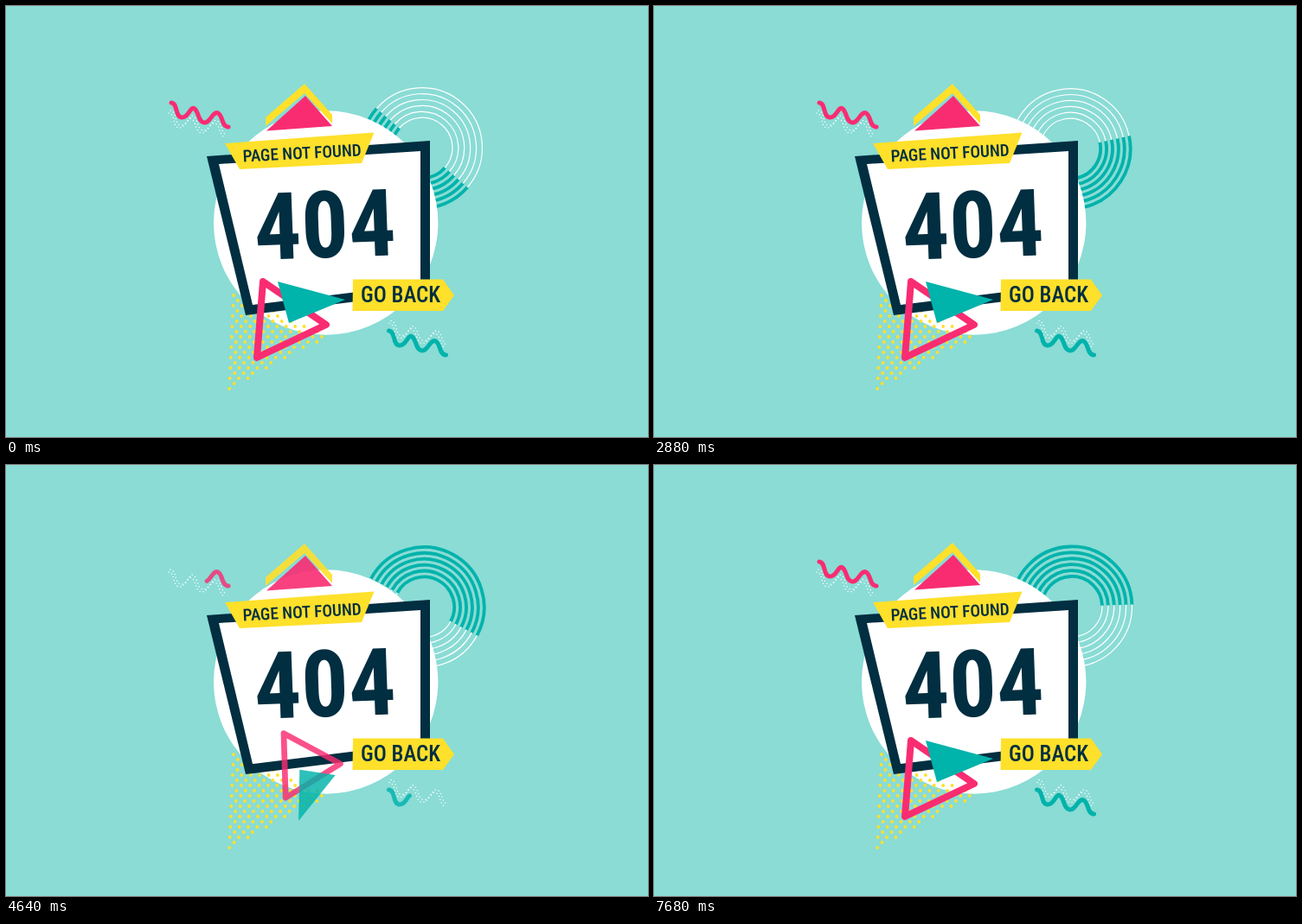
An HTML page for the animation above (7.84 s loop, 742 by 499 pixels).

```html
<!DOCTYPE html>
<html lang="en">
<head>
<meta charset="utf-8">
<title>Page not found</title>
<style>
  html, body { margin: 0; width: 100%; height: 100%; overflow: hidden; background: #8adcd5; }
  svg { display: block; width: 742px; height: 499px; }
  text { font-family: "Roboto Condensed", Roboto, sans-serif; font-stretch: 75%; fill: #012e40; }
  .wave, .dotted { fill: none; stroke-linecap: round; }
  .wave { stroke-width: 5; }
  .dotted { stroke: #fff; stroke-width: 1.5; stroke-dasharray: 0 4; }
</style>
</head>
<body>
<svg viewBox="0 0 742 499">
  <defs>
    <path id="curve" pathLength="1" d="M191 112C199 113 195 128 203 129S213 115 218 119S222 134 229 135S239 121 245 124S249 140 257 140"/>
    <path id="trail" d="M191 112C199 113 195 128 203 129S213 115 218 119S222 134 229 135S239 121 245 124S249 140 257 140"/>
  </defs>

  <g id="rings" fill="none"></g>
  <circle cx="369.7" cy="251" r="129.7" fill="#fff"/>
  <g id="dots" fill="#ffe02a"></g>
  <path fill="#012e40" d="M232 174L490 156V331.500L277 358Z"/>
  <path fill="#fff" d="M246 183L479 168V322L285 346Z"/>

  <g id="peak">
    <path fill="#ffe02a" d="M300 129L345 90L377 126V136L345 101L300 139Z"/>
    <path fill="#f92c72" d="M346 104L377 139L301 144.500Z"/>
  </g>

  <path fill="#ffe02a" d="M253 159L425.500 146.500L411 182L270 189Z"/>
  <text transform="translate(274 180.500) rotate(-3)" font-size="19.300" font-weight="500">PAGE NOT FOUND</text>
  <text transform="translate(288 294) rotate(-2)" font-size="108" font-weight="700">404</text>
  <path fill="#ffe02a" d="M401 316.500H505L518 335L505 353H400.500Z"/>
  <text x="410" y="342.500" font-size="25" font-weight="500">GO BACK</text>

  <g id="triangles">
    <path class="fade" fill="none" stroke="#f92c72" stroke-width="8" stroke-linejoin="round" d="M297 319L370 369L290 407Z"/>
    <path class="fade" fill="#00b3ab" d="M314 319L392 340L327 367Z"/>
  </g>

  <use href="#trail" class="dotted" x="-1" y="9"/>
  <use href="#trail" class="dotted" x="-3" y="12"/>
  <use href="#trail" class="dotted" x="252" y="255.500"/>
  <use href="#trail" class="dotted" x="254" y="252.500"/>
  <use href="#curve" id="pinkWave" class="wave fade" stroke="#f92c72"/>
  <use href="#curve" id="tealWave" class="wave fade" stroke="#00b3ab" x="251.500" y="264"/>
</svg>
<script>
const LOOP = 7840, STEP = 160, RESTART = 4380;
const $ = id => document.getElementById(id);
const clamp = v => Math.max(0, Math.min(1, v));

// Half of each ring is a thick teal arc, the other half a thin white one.
function buildRings() {
  let out = "";
  for (let i = 0; i < 6; i++) {
    const r = 35 + i * 6.9;
    const half = (sweep, paint) =>
      `<path d="M${483 - r} 164A${r} ${r} 0 0 ${sweep} ${483 + r} 164" ${paint}/>`;
    out += half(1, 'stroke="#00b3ab" stroke-width="3.8"') + half(0, 'stroke="#fff" stroke-width="1.2"');
  }
  $("rings").innerHTML = out;
}

// Staggered dots that fill a triangle.
function buildDots() {
  let out = "";
  for (let row = 0; row < 19; row++) {
    const y = 335 + row * 6;
    const left = 263 - row * 0.27;
    const right = Math.min(263 + (y - 333) * 2.35, 374 - (y - 381) * 1.82);
    for (let x = left + (row % 2) * 5.2; x <= Math.max(left, right); x += 10.4)
      out += `<circle cx="${x}" cy="${y}" r="1.9"/>`;
  }
  $("dots").innerHTML = out;
}

function draw(time) {
  const t = Math.floor(time % LOOP / STEP) * STEP;
  const since = t < RESTART ? Infinity : t - RESTART;

  const angle = t < RESTART ? t * 0.1065 - 139 : since * 0.1085;
  $("rings").setAttribute("transform", `rotate(${angle} 482 164.5)`);

  const opacity = clamp(since / 315);
  document.querySelectorAll(".fade").forEach(el => el.setAttribute("opacity", opacity));

  const spin = 1 - clamp(since / 380);
  $("triangles").setAttribute("transform",
    `translate(338.5 363) rotate(${360 * spin}) scale(${1 - spin / 2}) translate(-338.5 -363)`);

  const rise = clamp(since / 290);
  $("peak").setAttribute("opacity", rise);
  $("peak").setAttribute("transform", `translate(0 ${10 * (1 - rise)})`);

  const drawn = clamp(since / 700);
  const dash = drawn < 1 ? `${drawn} 2` : "none";
  $("tealWave").style.strokeDasharray = dash;
  $("pinkWave").style.strokeDasharray = dash;
  $("pinkWave").style.strokeDashoffset = drawn - 1;
}

buildRings();
buildDots();
const start = performance.now();
function tick() {
  draw(performance.now() - start);
  requestAnimationFrame(tick);
}
tick();
</script>
</body>
</html>
```
